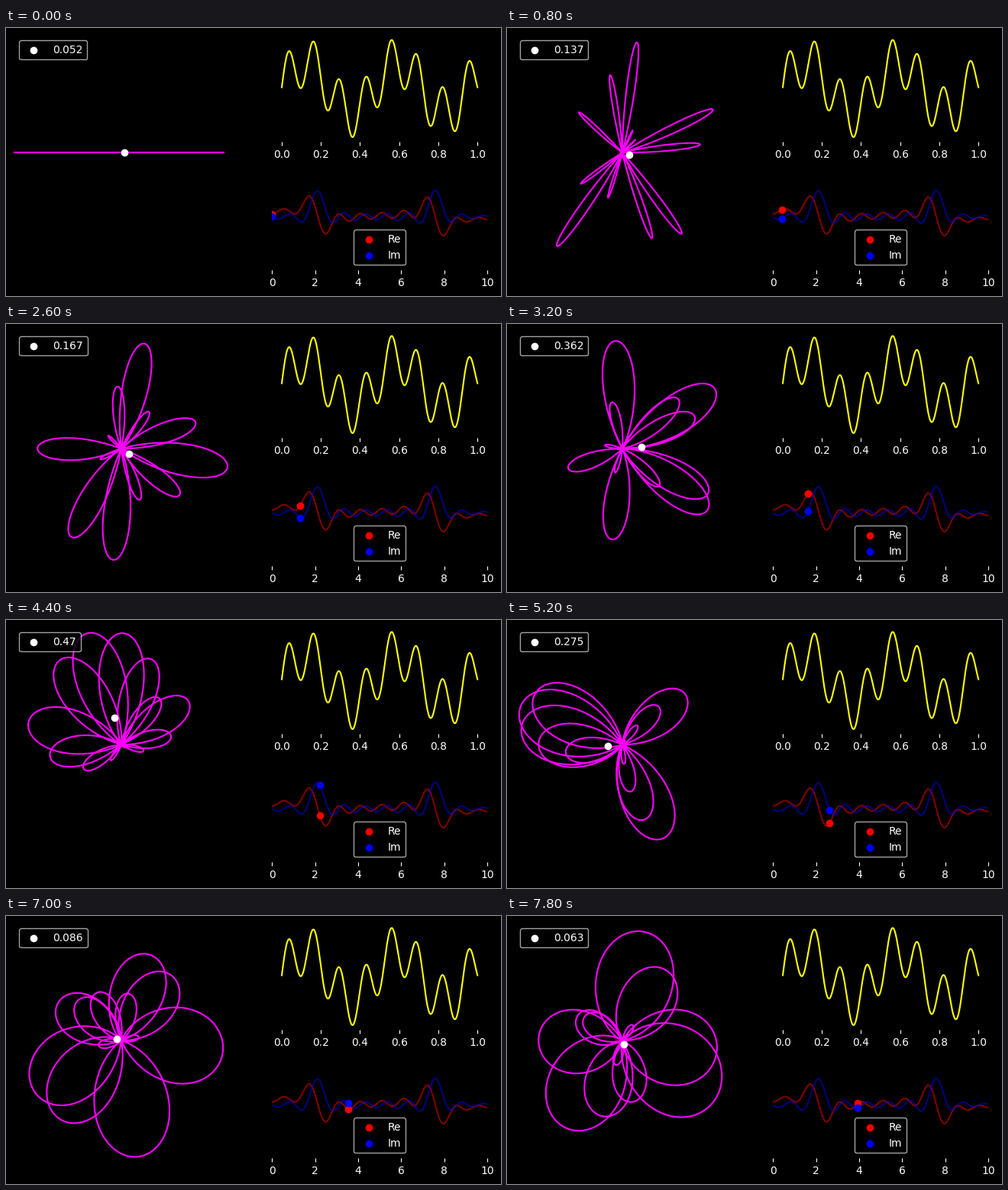
A matplotlib script that plays this animation: 648 by 351 pixels, repeating every 8000 ms.

```python
import numpy as np
import matplotlib.pyplot as plt
from matplotlib.animation import FuncAnimation

plt.style.use("dark_background")

W, H, DPI = 648, 351, 100
FRAMES, INTERVAL = 40, 200

t = np.linspace(0, 1, 1000)
signal = np.sin(2 * np.pi * 2.1 * t) + np.sin(2 * np.pi * 7.6 * t)
freqs = np.linspace(0, 10, 100)


def wind(freq):
    """Wrap the signal around the complex plane."""
    return signal * np.exp(2j * np.pi * freq * t)


centers = np.array([wind(f).mean() for f in freqs])

fig = plt.figure(figsize=(W / DPI, H / DPI), dpi=DPI)


def add_axes(left, top, width, height):
    """Add axes from a pixel box measured from the top left corner."""
    ax = fig.add_axes([left / W, 1 - (top + height) / H, width / W, height / H])
    ax.spines[:].set_visible(False)
    ax.set_yticks([])
    return ax


LEFT, TOP = 10, 9.28
col = 620 / 2.2
row = 308 / 2.2
right = LEFT + 1.2 * col

wind_ax = add_axes(LEFT, TOP, col, 308)
wind_ax.set_xticks([])
wind_ax.set(xlim=(-2, 2), ylim=(-2, 2))
curve, = wind_ax.plot([], [], color="magenta")
center_dot = wind_ax.scatter([0], [0], color="white", zorder=3)

signal_ax = add_axes(right, TOP, col, row)
signal_ax.plot(t, signal, color="yellow")

freq_ax = add_axes(right, TOP + 1.2 * row, col, row)
freq_ax.set(xlim=(0, 10), ylim=(-1, 1))
freq_ax.plot(freqs, centers.real, color="red", alpha=0.5)
freq_ax.plot(freqs, centers.imag, color="blue", alpha=0.5)
re_dot = freq_ax.scatter([0], [0], color="red", label="Re", zorder=3)
im_dot = freq_ax.scatter([0], [0], color="blue", label="Im", zorder=3)
freq_ax.legend(loc="lower center")


def update(i):
    z, c = wind(freqs[i]), centers[i]
    curve.set_data(z.real, z.imag)
    center_dot.set_offsets([[c.real, c.imag]])
    center_dot.set_label(str(round(float(abs(c)), 3)))
    wind_ax.legend(loc="upper left")
    re_dot.set_offsets([[freqs[i], c.real]])
    im_dot.set_offsets([[freqs[i], c.imag]])
    return curve, center_dot, re_dot, im_dot


anim = FuncAnimation(fig, update, frames=FRAMES, interval=INTERVAL,
                     repeat=True, repeat_delay=0, blit=False)
plt.show()
```
